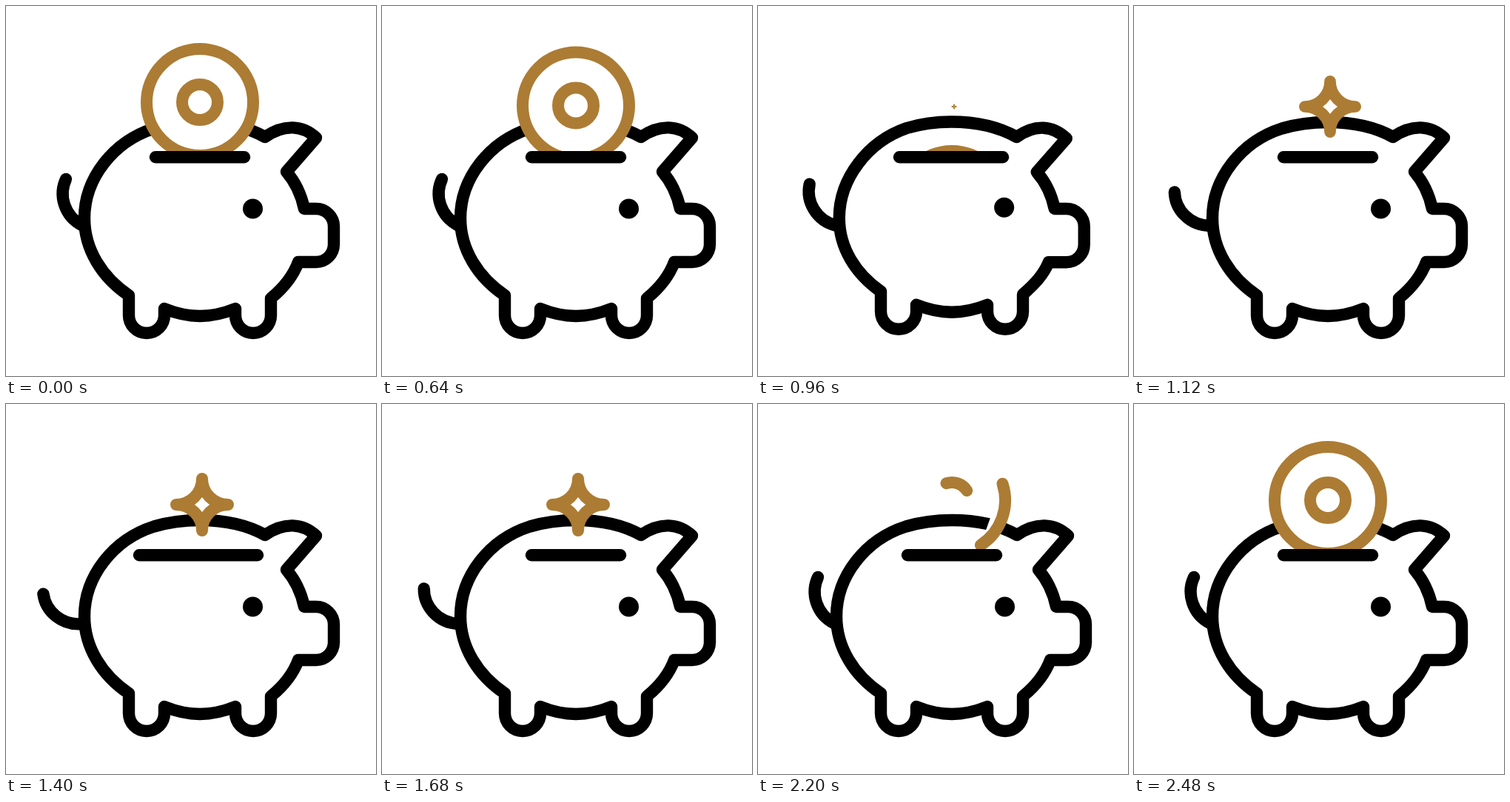
Write an HTML page that moves like this. It is 500 px wide and 500 px high and loops after 3000 ms.

```html
<!DOCTYPE html>
<html lang="en">
<head>
<meta charset="utf-8">
<title>Piggy bank</title>
<style>
  html, body { margin: 0; width: 100%; height: 100%; overflow: hidden; background: #fff; }
  svg { display: block; width: 100vw; height: 100vh; }
  path, line { stroke-linecap: round; stroke-linejoin: round; }
  .ink { stroke: #000; stroke-width: 16.4; fill: #fff; }
  .gold { stroke: #ac7c34; stroke-width: 16; fill: #fff; }
</style>
</head>
<body>
<svg viewBox="0 0 500 500">
  <clipPath id="above"><rect width="500" height="204"/></clipPath>
  <path id="tail" class="ink" style="fill:none" d="M81 234C71 255 78 284 104 297"/>
  <path id="pig" class="ink"/>
  <circle id="eye" r="13.5"/>
  <g clip-path="url(#above)">
    <g id="coin">
      <circle id="rim" fill="#fff"/>
      <path id="outer" class="gold"/>
      <path id="inner" class="gold"/>
    </g>
  </g>
  <line id="slot" class="ink" y1="204.2" y2="204.2"/>
  <path id="star" class="gold" d="M0-35A35 35 0 0 0 35 0A35 35 0 0 0 0 35A35 35 0 0 0-35 0A35 35 0 0 0 0-35Z"/>
</svg>
<script>
const LOOP = 3000, STEP = 40;
const $ = id => document.getElementById(id);
const set = (id, attrs) => {
  for (const k in attrs) $(id).setAttribute(k, attrs[k]);
};

// Smooth 0 to 1 between two times, and a rise followed by a fall.
const ease = (t, a, b) => {
  const x = Math.min(1, Math.max(0, (t - a) / (b - a)));
  return x * x * (3 - 2 * x);
};
const pulse = (t, a, b, c, d) => ease(t, a, b) - ease(t, c, d);

// Body outline; k is how far it is squeezed.
function pigPath(k) {
  const l = 7.5 * k, u = 10.5 * k, s = 4.5 * k, top = 157 - k;
  return `M${350 - k} 177
    C${325 - k} 163 ${295 - k} ${top} ${262 - 2 * k} ${top}
    C${241 - k} ${top} ${219 + k} ${160 - k} ${200 + 2 * k} ${165.5 - k}
    C${145 + l} 183 ${106 + l} 233 ${106 + l} ${287 - k}
    C${106 + l} ${329 - 4 * k} ${130 + l / 2} ${367 - u} 166 ${391 - u}
    V${418 - u} a24 24 0 0 0 48 0 V${409 - u}
    C229 ${415 - u} 245 ${419 - u} 262 ${419 - u}
    S295 ${415 - u} 310 ${409 - u}
    V${418 - u} a24 24 0 0 0 48 0 V${395 - u}
    C${375 - s / 2} ${381 - u} ${388 - s} ${365 - u / 3} ${395 - s} ${346 + k / 2}
    H${419 - s} A24 24 0 0 0 ${443 - s} ${322 + k / 2}
    V298 A24 24 0 0 0 ${419 - s} 274 H${403 - s}
    C${399 - s} 255 ${391 - s} 238 ${379 - s} ${224 + k}
    L${419 - s} ${178 + 2 * k}
    C${401 - s} ${161 + k} ${376 - s / 2} 159 ${350 - k} 177Z`;
}

// Counterclockwise arc around the coin centre, angles in degrees.
function arc(r, from, span) {
  const at = deg => {
    const a = deg * Math.PI / 180;
    return `${262 + r * Math.cos(a)} ${130 + r * Math.sin(a)}`;
  };
  if (span > 359.9) return `M${262 + r} 130A${r} ${r} 0 1 0 ${262 - r} 130A${r} ${r} 0 1 0 ${262 + r} 130Z`;
  return `M${at(from)}A${r} ${r} 0 ${span > 180 ? 1 : 0} 0 ${at(from - span)}`;
}

function draw(t) {
  const k = pulse(t, 640, 840, 840, 1080);
  set('pig', { d: pigPath(k) });
  set('eye', { cx: 333.5 - 1.7 * k, cy: 274 - 3.5 * k });

  const open = k + pulse(t, 1160, 1400, 1400, 1640);
  set('slot', { x1: 202 - 22 * open, x2: 322 + 18 * open });

  const swing = -33 * pulse(t, 734, 1262, 1508, 2036);
  set('tail', { transform: `translate(${4.5 * k} 0) rotate(${swing} 104 297)` });

  // The coin falls through the slot, later it is drawn anew.
  const falling = t < 1072;
  const x = Math.min(1, Math.max(0, (t - 1760) / 720));
  const span = falling ? 360 : 360 * (0.2 * x + 0.8 * x ** 4.5);
  const from = 124 - (t - 2000) / 3;
  set('coin', {
    transform: `translate(0 ${falling ? 160 * ease(t, 592, 1072) : 0})`,
    visibility: falling || t > 1800 ? 'visible' : 'hidden'
  });
  set('rim', { cx: 262, cy: 130, r: falling ? 79 + 3 * k : 0 });
  set('outer', { d: arc(72, from, span) });
  set('inner', { d: arc(24, from - 90, span) });

  const size = pulse(t, 920, 1140, 1680, 1900);
  set('star', {
    transform: `translate(265 136) scale(${size})`,
    visibility: size > 0 ? 'visible' : 'hidden'
  });
}

const start = performance.now();
function tick() {
  const t = (performance.now() - start) % LOOP;
  draw(Math.floor(t / STEP) * STEP);
  requestAnimationFrame(tick);
}
tick();
</script>
</body>
</html>
```
